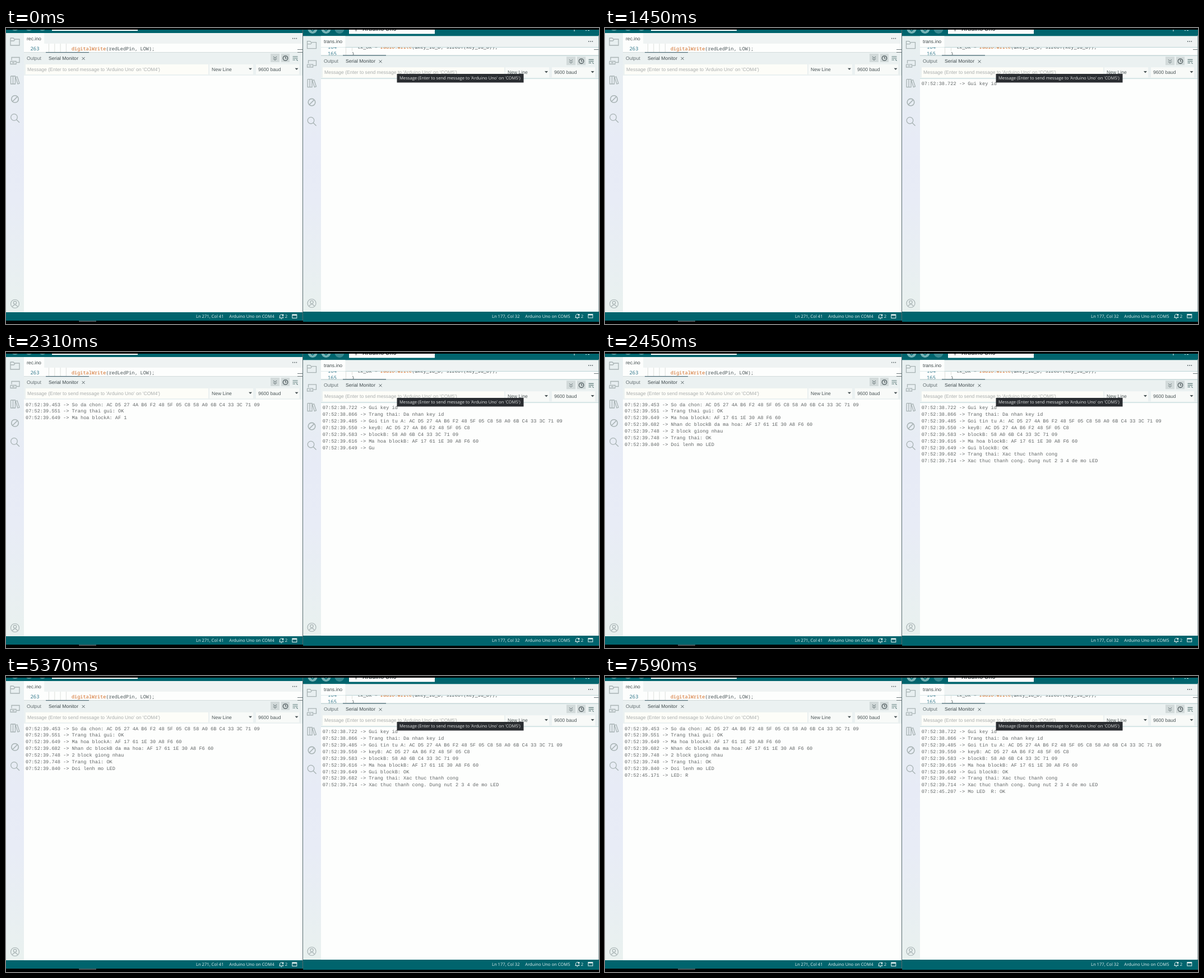
An HTML page with a canvas for the animation above (8000 ms loop, 1058x529 px).

```html
<!DOCTYPE html>
<html lang="en">
<head>
<meta charset="utf-8">
<title>Two serial monitors</title>
<style>
html, body { margin: 0; width: 100%; height: 100%; overflow: hidden; background: #000; }
canvas { display: block; }
</style>
</head>
<body>
<canvas id="stage" width="1058" height="529"></canvas>
<script>
const ctx = document.getElementById('stage').getContext('2d');
const LOOP = 8000;
const TEAL = '#00646d', BAR = '#ebf1f1', PAPER = '#fdfefd', ICON = '#a8b3b4', INK = '#4c5658';
const SANS = '"Liberation Sans", Arial, sans-serif';
const OPEN = '"Open Sans", sans-serif';
const MONO = '"Liberation Mono", monospace';
const CODE = '"Noto Sans Mono", monospace';

const KEY = 'AC D5 27 4A B6 F2 48 5F 05 C8';
const BLOCK = '58 A0 6B C4 33 3C 71 09';
const CIPHER = 'AF 17 61 1E 30 A8 F6 60';

// Each entry: seconds, message, then [time, visible characters] steps (no count = whole line)
const receiverLog = [
  ['39.453', `So da chon: ${KEY} ${BLOCK}`, [2150, 29], [2170, 47], [2190]],
  ['39.551', 'Trang thai gui: OK', [2210, 10], [2250]],
  ['39.649', `Ma hoa blockA: ${CIPHER}`, [2310, 19], [2410]],
  ['39.682', `Nhan dc blockB da ma hoa: ${CIPHER}`, [2410]],
  ['39.748', '2 block giong nhau', [2410]],
  ['39.748', 'Trang thai: OK', [2450]],
  ['39.840', 'Doi lenh mo LED', [2450]],
  ['45.171', 'LED: R', [7490]]
];
const senderLog = [
  ['38.722', 'Gui key id', [1450]],
  ['38.866', 'Trang thai: Da nhan key id', [1570]],
  ['39.485', `Goi tin tu A: ${KEY} ${BLOCK}`, [2150, 28], [2170, 46], [2190]],
  ['39.550', `keyB: ${KEY}`, [2210, 14], [2250]],
  ['39.583', `blockB: ${BLOCK}`, [2250, 16], [2310]],
  ['39.616', `Ma hoa blockB: ${CIPHER}`, [2310]],
  ['39.649', 'Gui blockB: OK', [2310, 2], [2410]],
  ['39.682', 'Trang thai: Xac thuc thanh cong', [2410]],
  ['39.714', 'Xac thuc thanh cong. Dung nut 2 3 4 de mo LED', [2410]],
  ['45.207', 'Mo LED  R: OK', [7590]]
];

function box(x, y, w, h, color) {
  ctx.fillStyle = color;
  ctx.fillRect(x, y, w, h);
}

function label(str, x, y, color = INK, font = SANS, size = 8.6, weight = '') {
  ctx.font = `${weight} ${size}px ${font}`;
  ctx.fillStyle = color;
  ctx.fillText(str, x, y + size * 0.35);
  return x + ctx.measureText(str).width;
}

function line(color, width, ...paths) {
  ctx.strokeStyle = color;
  ctx.lineWidth = width;
  ctx.beginPath();
  for (const p of paths) {
    ctx.moveTo(p[0], p[1]);
    for (let i = 2; i < p.length; i += 2) ctx.lineTo(p[i], p[i + 1]);
  }
  ctx.stroke();
}

function ring(x, y, r, color, width, from = 0, to = 2 * Math.PI) {
  ctx.strokeStyle = color;
  ctx.lineWidth = width;
  ctx.beginPath();
  ctx.arc(x, y, r, from, to);
  ctx.stroke();
}

function disc(x, y, r, color) {
  ctx.fillStyle = color;
  ctx.beginPath();
  ctx.arc(x, y, r, 0, 2 * Math.PI);
  ctx.fill();
}

function caret(x, y) {
  ctx.fillStyle = INK;
  ctx.beginPath();
  ctx.moveTo(x - 3, y - 1.5);
  ctx.lineTo(x + 3, y - 1.5);
  ctx.lineTo(x, y + 1.8);
  ctx.fill();
}

function sideIcons(x, y, personY) {
  // folder
  line(ICON, 1.3, [x - 8, y - 6, x - 3, y - 6, x - 1, y - 4, x + 8, y - 4, x + 8, y + 7, x - 8, y + 7, x - 8, y - 6.6],
    [x - 8, y - 1, x - 2, y - 1, x, y - 3]);
  // board
  let c = y + 34.5;
  line(ICON, 1.3, [x - 6, c - 1, x - 6, c - 6, x + 8, c - 6, x + 8, c + 3, x + 3, c + 3],
    [x - 8, c + 1, x + 2, c + 1, x + 2, c + 6, x - 8, c + 6, x - 8, c + 1], [x - 5, c + 3.5, x - 1, c + 3.5]);
  // books
  c = y + 69;
  line(ICON, 1.3, [x - 7.5, c - 7, x - 3.5, c - 7, x - 3.5, c + 7, x - 7.5, c + 7, x - 7.5, c - 7],
    [x - 3.5, c - 7, x + 0.5, c - 7, x + 0.5, c + 7, x - 3.5, c + 7],
    [x + 1, c - 5, x + 4, c - 6, x + 8, c + 6, x + 5, c + 7, x + 1, c - 5]);
  // no entry
  c = y + 103;
  ring(x, c, 6.3, ICON, 1.6);
  line(ICON, 1.6, [x - 4.3, c + 4.3, x + 4.3, c - 4.3]);
  // search
  c = y + 137;
  ring(x - 1.5, c - 1.5, 5.8, ICON, 1.3);
  line(ICON, 1.4, [x + 2.7, c + 2.7, x + 8, c + 8]);
  // account
  ring(x, personY, 7.5, ICON, 1.2);
  ring(x, personY - 2, 2.7, ICON, 1.2);
  ring(x, personY + 7, 5, ICON, 1.2, Math.PI * 1.13, Math.PI * 1.87);
}

function monitorButtons(x, y) {
  box(x - 8, y - 8, 16, 15, '#d2dada');
  box(x + 11, y - 8, 15, 15, '#d2dada');
  line('#7d8a8c', 1.1, [x - 3, y - 3, x, y, x + 3, y - 3], [x - 3, y + 0.5, x, y + 3.5, x + 3, y + 0.5]);
  ring(x + 18.5, y, 4.2, '#4f5b5e', 1.3);
  line('#4f5b5e', 1.1, [x + 18.5, y - 2.7, x + 18.5, y, x + 20.7, y]);
  line('#5b7a78', 1.2, [x + 31.5, y - 3, x + 40.5, y - 3], [x + 31.5, y, x + 40.5, y],
    [x + 31.5, y + 3, x + 36, y + 3], [x + 38, y + 2, x + 40.5, y + 4.5]);
}

function statusBar(x, y, position, port) {
  label(position, x, y, '#e4f0f0', OPEN, 7.63);
  const px = x + 59.3;
  label('Arduino Uno on ' + port, px, y, '#e4f0f0', OPEN, 7.63);
  // bell
  const bx = px + 93;
  line('#e4f0f0', 1, [bx - 4, y + 2.5, bx + 4, y + 2.5], [bx - 2.8, y + 2.5, bx - 2.8, y - 1.5, bx - 1, y - 3.5, bx + 1, y - 3.5],
    [bx + 2.8, y + 2.5, bx + 2.8, y], [bx - 1, y + 4.2, bx + 1, y + 4.2]);
  disc(bx + 2.6, y - 2.4, 1.7, '#e4f0f0');
  label('2', px + 99.5, y, '#e4f0f0', OPEN, 7.63);
  // panel toggle
  ctx.strokeRect(px + 112.5, y - 3.5, 8, 6.5);
  box(px + 112.5, y - 3.5, 8, 2, '#e4f0f0');
}

function sidebar(x, y, bottom) {
  const g = ctx.createLinearGradient(0, y, 0, bottom);
  g.addColorStop(0, '#e8f0f0');
  g.addColorStop(0.38, '#e7ebf6');
  g.addColorStop(0.6, '#e8ecf6');
  g.addColorStop(1, '#e9f1ef');
  box(x, y, 32, bottom - y, g);
}

// x, y: pane origin; rx: origin for the right aligned parts
function pane(x, y, rx, bottom, file, port, tabsEnd) {
  sidebar(x, y + 9, bottom);
  box(x + 32, y + 9, 497, tabsEnd - y - 9, '#eff3f3');
  box(x + 32, y + 9, file.length * 3.6 + 11, tabsEnd - y - 9, PAPER);
  label(file, x + 37, y + 19, '#3c4648');
  for (let i = -1; i < 2; i++) disc(rx + 515 + i * 3.3, y + 18.7, 0.9, '#5a6568');
  box(x + 32, tabsEnd, 497, y + 44 - tabsEnd, PAPER);
}

function panel(x, y, rx, bottom, port) {
  box(x + 32, y + 44, 497, 41, BAR);
  box(x + 32, y + 43, 497, 1, '#d3dcdc');
  box(x + 71, y + 43, 77, 1.2, '#4d6b76');
  label('Output', x + 37, y + 54, '#667073');
  label('Serial Monitor', x + 76, y + 54, '#3f494c');
  line('#5b6669', 1, [x + 135.6, y + 52, x + 140.6, y + 57], [x + 140.6, y + 52, x + 135.6, y + 57]);
  monitorButtons(rx + 480, y + 54);
  box(x + 35, y + 65, rx + 361 - x - 35, 18, '#fdfdf8');
  box(rx + 363, y + 65, 78, 18, '#f8faf8');
  box(rx + 446, y + 65, 77, 18, '#f8faf8');
  label(`Message (Enter to send message to 'Arduino Uno' on '${port}')`, x + 38, y + 73.5, '#a9adad');
  label('New Line', rx + 367, y + 73.5);
  caret(rx + 436, y + 73.3);
  label('9600 baud', rx + 450, y + 73.5);
  caret(rx + 518.5, y + 73.3);
  box(x + 32, y + 85, 497, bottom - y - 85, PAPER);
}

function logLines(log, x, y, t) {
  log.forEach(([sec, msg, ...steps], i) => {
    const step = steps.filter(s => s[0] <= t).pop();
    if (step) label(`07:52:${sec} -> ${msg.slice(0, step[1])}`, x, y + i * 11.92, '#606465', MONO);
  });
}

function clipped(x, y, w, h, draw) {
  ctx.save();
  ctx.beginPath();
  ctx.rect(x, y, w, h);
  ctx.clip();
  draw();
  ctx.restore();
}

function codeRun(x, y, parts) {
  for (const [str, color] of parts) x = label(str, x, y, color, CODE, 8.53);
}

function receiver(t) {
  clipped(0, 3, 529, 520, () => {
    box(0, 3, 529, 520, TEAL);
    for (const x of [16, 41, 65]) disc(x, -2, 7, '#5b9da2');
    box(82, 0, 153, 5, '#fff');
    pane(0, 0, 0, 508, 'rec.ino', 'COM4', 28);
    for (let i = 0; i < 4; i++) box(76 + i * 10.3, 28, 1, 16, '#dde0dc');
    label('263', 43.5, 37, '#34798c', CODE, 8.9);
    codeRun(117, 37, [['digitalWrite', '#d0671f'], ['(redLedPin, LOW);', '#4a5558']]);
    box(520, 38, 9, 1, '#6b7779');
    panel(0, 0, 0, 508, 'COM4');
    box(520, 43, 9, 1, '#6b7779');
    sideIcons(16, 24, 493);
    statusBar(339, 515.5, 'Ln 271, Col 41', 'COM4');
  });
  box(130, 523, 31, 2, '#4b5558');
  logLines(receiverLog, 35, 93.5, t);
}

function sender(t) {
  clipped(530, 3, 528, 522, () => {
    box(530, 3, 528, 522, TEAL);
    for (const x of [547, 571, 595]) disc(x, 1.5, 8.5, x > 590 ? '#3b8a91' : '#76b3b6');
    for (const x of [547, 571]) line(TEAL, 1.5, [x - 3, 3, x, 5.5, x + 3, 3]);
    box(612, 0, 153, 10.5, '#fff');
    line('#3c4648', 1, [624.5, 0, 624.5, 6], [622, 1, 624.5, 4, 627, 1]);
    label('Arduino Uno', 636, 1.8, '#2f393b', SANS, 10, 'bold');
    line('#c5dede', 1.2, [1014, 2, 1014, 6], [1034, 4.5, 1036, 4.5], [1038, 4.5, 1041, 4.5]);
    pane(530, 5.3, 528, 507, 'trans.ino', 'COM5', 34.5);
    clipped(562, 34.5, 496, 15, () => {
      box(606, 34, 1, 16, '#dde0dc');
      box(617, 34, 1, 7, '#dde0dc');
      label('164', 574, 34, '#34798c', CODE, 8.9);
      codeRun(627, 34, [['tx_ok = ', '#4a5558'], ['radio', '#d0671f'], ['.', '#4a5558'], ['write', '#d0671f'],
        ['(&key_id_b, sizeof(key_id_b));', '#4a5558']]);
      label('165', 574, 46, '#34798c', CODE, 8.9);
      label('}', 616.8, 46, '#4a5558', CODE, 8.53);
      box(1049, 38, 9, 1, '#6b7779');
    });
    panel(530, 5.3, 528, 507, 'COM5');
    sideIcons(545.5, 29.7, 492);
    statusBar(867, 515, 'Ln 177, Col 32', 'COM5');
  });
  logLines(senderLog, 564.7, 99, t);
  box(697.5, 82, 226, 15.5, '#2a2d31');
  label("Message (Enter to send message to 'Arduino Uno' on 'COM5')", 702, 89.8, '#e3e5e5', OPEN, 7.62);
}

function draw(now) {
  const t = now % LOOP;
  ctx.textRendering = 'geometricPrecision';
  box(0, 0, 1058, 529, '#000');
  receiver(t);
  sender(t);
  box(529, 3, 1, 520, '#55696d');
  box(1057, 13, 1, 494, '#8fa3a6');
  requestAnimationFrame(draw);
}
requestAnimationFrame(draw);
</script>
</body>
</html>
```
